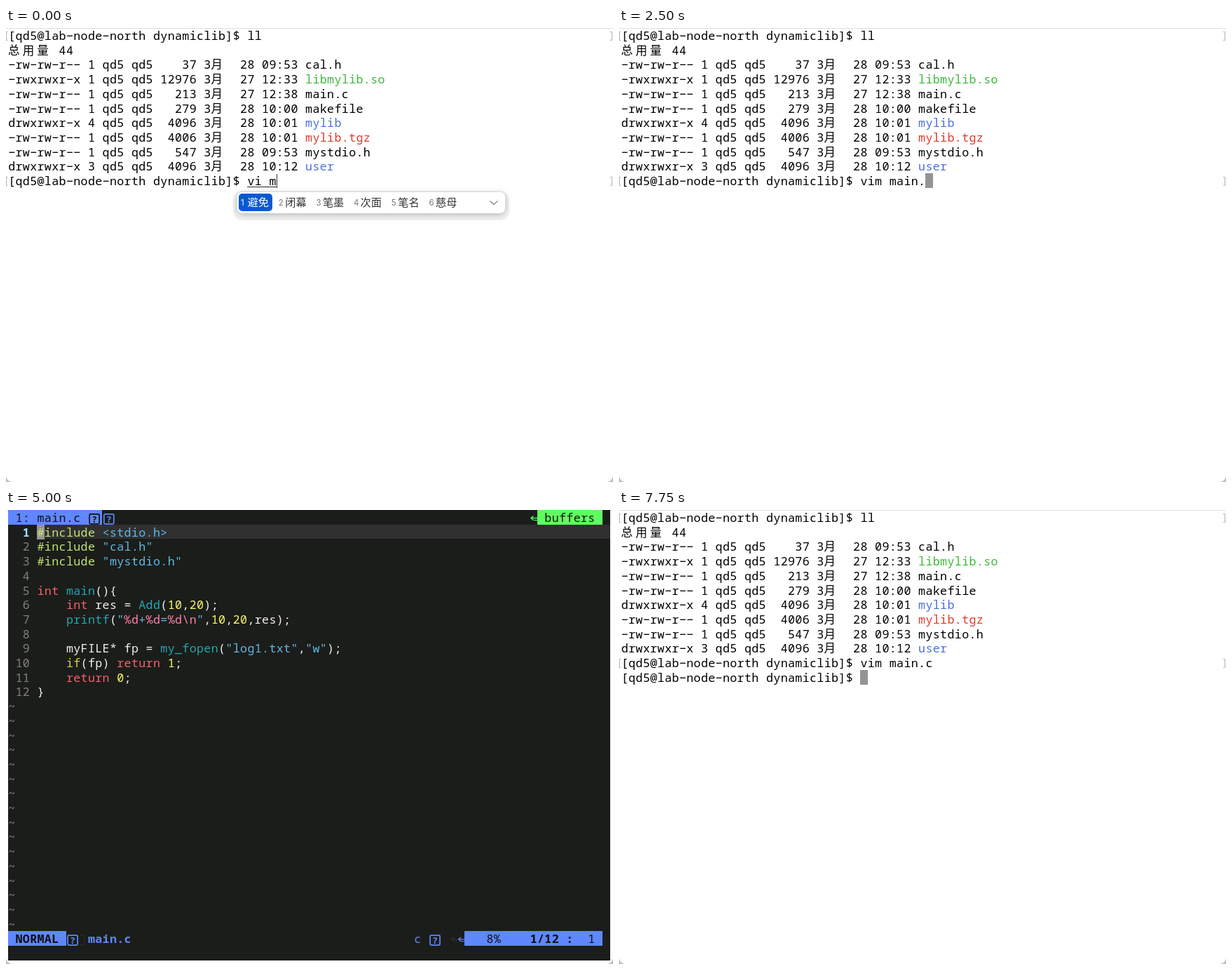
Write an HTML page with a canvas that moves like this. It is 866 by 647 pixels and loops after 8 s.

```html
<!DOCTYPE html>
<html lang="zh">
<head>
<meta charset="utf-8">
<title>Terminal</title>
<style>
html, body { margin: 0; width: 100%; height: 100%; overflow: hidden; background: #fff; }
canvas { display: block; width: 866px; height: 647px; }
</style>
</head>
<body>
<canvas id="stage" width="866" height="647"></canvas>
<script>
const ctx = document.getElementById('stage').getContext('2d');
const W = 866, H = 647, LOOP = 8000;
const CELL = 10.34, LINE = 20.7, LEFT = 3;
const MONO = '"Noto Sans Mono", "DejaVu Sans Mono", monospace';
const CJK = '"Noto Sans CJK SC", "Noto Sans CJK", sans-serif';
const BLUE = '#5f87ff', GREEN = '#5fff5f', DARK = '#1b1d1a', INK = '#111', CURSOR = '#949494';

const PROMPT = '[qd5@lab-node-north dynamiclib]$ ';
const COMMAND = 'vim main.c';
const FILES = [
  '-rw-rw-r-- 1 qd5 qd5    37 3月  28 09:53 cal.h',
  '-rwxrwxr-x 1 qd5 qd5 12976 3月  27 12:33 ^glibmylib.so',
  '-rw-rw-r-- 1 qd5 qd5   213 3月  27 12:38 main.c',
  '-rw-rw-r-- 1 qd5 qd5   279 3月  28 10:00 makefile',
  'drwxrwxr-x 4 qd5 qd5  4096 3月  28 10:01 ^bmylib',
  '-rw-rw-r-- 1 qd5 qd5  4006 3月  28 10:01 ^rmylib.tgz',
  '-rw-rw-r-- 1 qd5 qd5   547 3月  28 09:53 mystdio.h',
  'drwxrwxr-x 3 qd5 qd5  4096 3月  28 10:12 ^buser',
];
const SHELL_COLORS = { g: '#3cb83a', b: '#4a70d9', r: '#e03a2c' };
const CODE = [
  '^p#include ^s<stdio.h>',
  '^p#include ^s"cal.h"',
  '^p#include ^s"mystdio.h"',
  '',
  '^kint ^fmain^w(){',
  '    ^kint ^wres = ^fAdd^w(^n10^w,^n20^w);',
  '    ^fprintf^w(^s"^e%d^s+^e%d^s=^e%d\\n^s"^w,^n10^w,^n20^w,res);',
  '',
  '    myFILE* fp = ^fmy_fopen^w(^s"log1.txt"^w,^s"w"^w);',
  '    ^iif^w(fp) ^kreturn ^n1^w;',
  '    ^kreturn ^n0^w;',
  '}',
];
const CODE_COLORS = {
  p: '#bfe474', s: '#5fb9e6', k: '#f5606f', f: '#22a6ae', w: '#f0f0f0',
  n: '#fbfb68', e: '#ff7fa5', i: '#d3d52f',
};
const CANDIDATES = ['避免', '闭幕', '笔墨', '次面', '笔名', '慈母'];
// [time, typed characters of COMMAND]
const TYPING = [[500, 0], [750, 3], [1000, 4], [1250, 5], [1500, 7], [1750, 8], [2500, 9], [2750, 10]];
const ENTER = 3250, EDITOR = 3750, COLON = 5500, QUIT = 6000, CLOSED = 6750;

const colX = col => LEFT + col * CELL;
const rowY = row => row * LINE;

function rect(x, y, w, h, color) {
  ctx.fillStyle = color;
  ctx.fillRect(x, y, w, h);
}

function roundRect(x, y, w, h, radius, color) {
  ctx.fillStyle = color;
  ctx.beginPath();
  ctx.roundRect(x, y, w, h, radius);
  ctx.fill();
}

function cells(col, row, count, color) {
  const x = Math.round(colX(col)), y = Math.round(rowY(row));
  rect(x, y, Math.round(colX(col + count)) - x, Math.ceil(rowY(row + 1)) - y, color);
}

function path(points, color, width = 1) {
  ctx.strokeStyle = color;
  ctx.lineWidth = width;
  ctx.beginPath();
  points.forEach(([x, y]) => ctx.lineTo(x, y));
  ctx.stroke();
}

// Grid text; "^x" switches to color x of the palette.
function print(str, col, row, color, { palette = {}, weight = 500 } = {}) {
  const y = rowY(row) + 17;
  ctx.fillStyle = color;
  for (let i = 0; i < str.length; i++) {
    const ch = str[i];
    if (ch === '^') {
      ctx.fillStyle = palette[str[++i]];
    } else if (ch > '\u2fff') {
      ctx.font = `16.5px ${CJK}`;
      ctx.textAlign = 'left';
      ctx.fillText(ch, colX(col), y);
      col += 2;
    } else {
      ctx.font = `${weight} 16.7px ${MONO}`;
      ctx.textAlign = 'center';
      // The minus sign gives the wide hyphen of the terminal face.
      ctx.fillText(ch === '-' ? '\u2212' : ch, colX(col + 0.5), y);
      col++;
    }
  }
}

function missingGlyph(col, row, color) {
  const x = colX(col) + 1.6, y = rowY(row) + 5;
  ctx.strokeStyle = color;
  ctx.lineWidth = 1.7;
  ctx.beginPath();
  ctx.roundRect(x + 0.8, y + 0.8, 14, 14, 1.5);
  ctx.stroke();
  ctx.fillStyle = color;
  ctx.font = `700 13px ${MONO}`;
  ctx.textAlign = 'center';
  ctx.fillText('?', x + 7.8, y + 12.5);
}

function smallArrow(col, row, color) {
  const x = colX(col), y = rowY(row) + 11.5;
  path([[x + 10.5, y], [x + 2, y]], color, 1.3);
  path([[x + 5, y - 3], [x + 1.5, y], [x + 5, y + 3]], color, 1.3);
  path([[x + 5, y + 3], [x + 10.5, y + 3]], color, 1);
}

function windowFrame() {
  rect(0, 0, W, H, '#bdbdbd');
  roundRect(0, 0, W, H, [0, 0, 9, 9], '#fff');
  rect(0, 0, W, 1, '#dedede');
}

function promptMarks(row) {
  const top = rowY(row) + 5.5, bottom = top + 12;
  path([[2.5, top], [0.5, top], [0.5, bottom], [2.5, bottom]], '#b0b0b0');
  path([[862, top], [864.5, top], [864.5, bottom], [862, bottom]], '#b0b0b0');
}

function inputMethod() {
  rect(colX(33), 226, 4 * CELL, 1, '#222');
  rect(386, 208, 1, 20, '#333');

  roundRect(324, 232, 394, 42, 13, '#f1f1f1');
  ctx.save();
  ctx.shadowColor = 'rgba(0,0,0,.25)';
  ctx.shadowBlur = 8;
  ctx.shadowOffsetY = 2;
  roundRect(330, 234, 382, 30, 7, '#fff');
  ctx.restore();
  roundRect(332, 236, 48, 25, 5, '#0759d3');

  ctx.textAlign = 'left';
  CANDIDATES.forEach((word, i) => {
    const x = 335 + i * 53.7;
    ctx.fillStyle = i ? '#777' : '#fff';
    ctx.font = '11.5px Inter, sans-serif';
    ctx.fillText(i + 1, x, 253);
    ctx.fillStyle = i ? '#333' : '#fff';
    ctx.font = `15.2px ${CJK}`;
    ctx.fillText(word, x + 9.5, 254);
  });
  path([[690.5, 246.5], [696, 251.5], [701.5, 246.5]], '#808080', 1.2);
}

function shell(t) {
  const ink = '#000', closed = t >= CLOSED;
  promptMarks(0);
  promptMarks(10);
  print(PROMPT + 'll', 0, 0, ink);
  print('总用量 44', 0, 1, ink);
  FILES.forEach((line, i) => print(line, 0, i + 2, ink, { palette: SHELL_COLORS }));

  if (t < TYPING[0][0]) {
    print(PROMPT + 'vi m', 0, 10, ink);
    inputMethod();
    return;
  }
  const count = TYPING.filter(([at]) => t >= at).pop()[1];
  print(PROMPT + COMMAND.slice(0, count), 0, 10, ink);
  if (closed) print(PROMPT, 0, 11, ink);
  if (closed) cells(33, 11, 1, CURSOR);
  else if (t >= ENTER) cells(0, 11, 1, CURSOR);
  else cells(33 + count, 10, 1, CURSOR);
}

function tabLine() {
  cells(0, 0, 13, BLUE);
  print('1: main.c', 1, 0, INK);
  missingGlyph(11, 0, INK);
  missingGlyph(13, 0, BLUE);
  smallArrow(72, 0, GREEN);
  cells(73, 0, 9, GREEN);
  print('buffers', 74, 0, INK);
}

function statusLine(mode) {
  const end = mode.length + 2, bold = { weight: 700 };
  const x = colX(end + 2) - 1;
  cells(0, 29, end, BLUE);
  print(mode, 1, 29, INK, bold);
  missingGlyph(end, 29, BLUE);
  rect(colX(end + 1) + 6, 607, 1, 11, BLUE);
  path([[x, 606], [x + 6, 606], [x + 6, 619], [x, 619]], '#2b2d2c');
  print('main.c', end + 3, 29, BLUE, bold);
  print('c', 56, 29, BLUE);
  missingGlyph(58, 29, BLUE);
  smallArrow(61, 29, '#2b2d2c');
  smallArrow(62, 29, BLUE);
  cells(63, 29, 19, BLUE);
  print('8%', 66, 29, INK);
  print('1/12 :', 72, 29, INK, bold);
  print('1', 80, 29, INK);
}

function editor(t) {
  const command = t >= COLON;
  rect(LEFT, 0, 859, 642, DARK);
  tabLine();
  rect(44, 21, 818, 20, '#303030');
  if (!command) cells(4, 1, 1, CURSOR);
  CODE.forEach((line, i) => {
    const number = String(i + 1).padStart(2);
    if (i) print(number, 1, i + 1, '#808080');
    else print(number, 1, i + 1, '#9bddff', { weight: 600 });
    print(line, 4, i + 1, CODE_COLORS.w, { palette: CODE_COLORS });
  });
  for (let row = 13; row < 29; row++) print('~', 0, row, '#7b838a');
  statusLine(command ? 'COMMAND' : 'NORMAL');
  if (command) {
    const typed = t >= QUIT ? ':q' : ':';
    print(typed, 0, 30, '#f0f0f0');
    cells(typed.length, 30, 1, CURSOR);
  }
}

function draw() {
  const t = performance.now() % LOOP;
  windowFrame();
  if (t >= EDITOR && t < CLOSED) editor(t);
  else shell(t);
  requestAnimationFrame(draw);
}
draw();
</script>
</body>
</html>
```
